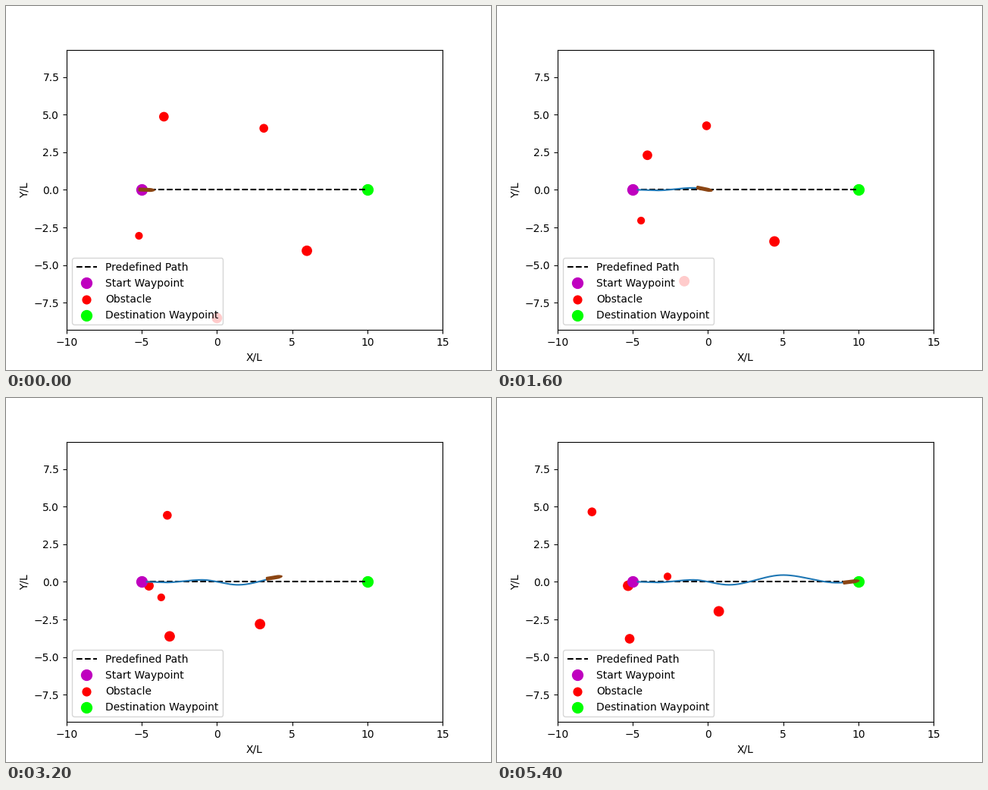
A matplotlib script for the animation above (5500 ms loop, 640 by 480 pixels).

```python
import numpy as np
import matplotlib.pyplot as plt
from matplotlib.animation import FuncAnimation

FRAMES = 55
INTERVAL = 100
SHIP_START = -4.67

# One row per obstacle: x, y, shift in x and y over the loop, marker area
OBSTACLES = np.array([
    (-3.53, 4.86, -1.68, -8.645, 66),
    (3.115, 4.09, -10.83, 0.56, 54),
    (-5.19, -3.055, 2.5, 3.41, 40),
    (5.98, -4.05, -5.26, 2.09, 80),
    (0.0, -8.52, -5.31, 8.26, 80),
])
place, shift, area = OBSTACLES[:, :2], OBSTACLES[:, 2:4], OBSTACLES[:, 4]

# Turning points of the ship's weaving track
TURNS = [(SHIP_START, 0), (-3.4, -0.04), (-1, 0.13), (1.4, -0.2),
         (5, 0.45), (8.6, -0.06), (11, 0.15)]


def track(x):
    """Height of the track: a smooth step between each pair of turns."""
    y = 0
    for (x0, y0), (x1, y1) in zip(TURNS, TURNS[1:]):
        t = np.clip((x - x0) / (x1 - x0), 0, 1)
        y = y + (y1 - y0) * t * t * (3 - 2 * t)
    return y


def ship_x(t):
    """Nearly steady advance, a little faster at both ends of the loop."""
    return SHIP_START + 14.2 * t + 2.9 * t * (t - 0.685) * (t - 1)


def hull_at(x):
    """Hull outline at x: straight sides, rounded bow, heading leads the track."""
    u = np.linspace(-0.5, 0.5, 21)
    half = 0.07 * (1 - np.clip((u - 0.2) / 0.3, 0, 1) ** 2)
    along = np.r_[u, u[::-1]]
    across = np.r_[half, -half[::-1]]
    a = np.arctan((track(x + 0.51) - track(x + 0.49)) / 0.02)
    return np.column_stack([x + along * np.cos(a) - across * np.sin(a),
                            track(x) + along * np.sin(a) + across * np.cos(a)])


fig, ax = plt.subplots(figsize=(6.4, 4.8), dpi=100)
box = ax.get_position()
half_height = 12.5 * (box.height * 4.8) / (box.width * 6.4)
ax.set_xlim(-10, 15)
ax.set_ylim(-half_height, half_height)
ax.set_xlabel("X/L")
ax.set_ylabel("Y/L")

ax.plot([-5, 10], [0, 0], "k--", label="Predefined Path")
ax.plot(-5, 0, "mo", markersize=10, label="Start Waypoint")
obstacles = ax.scatter(*place.T, s=area, color="red", label="Obstacle")
ax.scatter(10, 0, s=100, color="lime", label="Destination Waypoint")
trail, = ax.plot([], [], color="tab:blue")
ship, = ax.fill(*hull_at(SHIP_START).T, color="saddlebrown", linewidth=1.7,
                joinstyle="round", zorder=3)
ax.legend(loc="lower left")


def draw(frame):
    t = frame / (FRAMES - 1)
    obstacles.set_offsets(place + shift * t)
    x = ship_x(t)
    xs = np.linspace(SHIP_START, x, 200)
    trail.set_data(xs, track(xs))
    ship.set_xy(hull_at(x))
    return obstacles, trail, ship


anim = FuncAnimation(fig, draw, frames=FRAMES, interval=INTERVAL,
                     repeat=True, repeat_delay=0)
plt.show()
```
